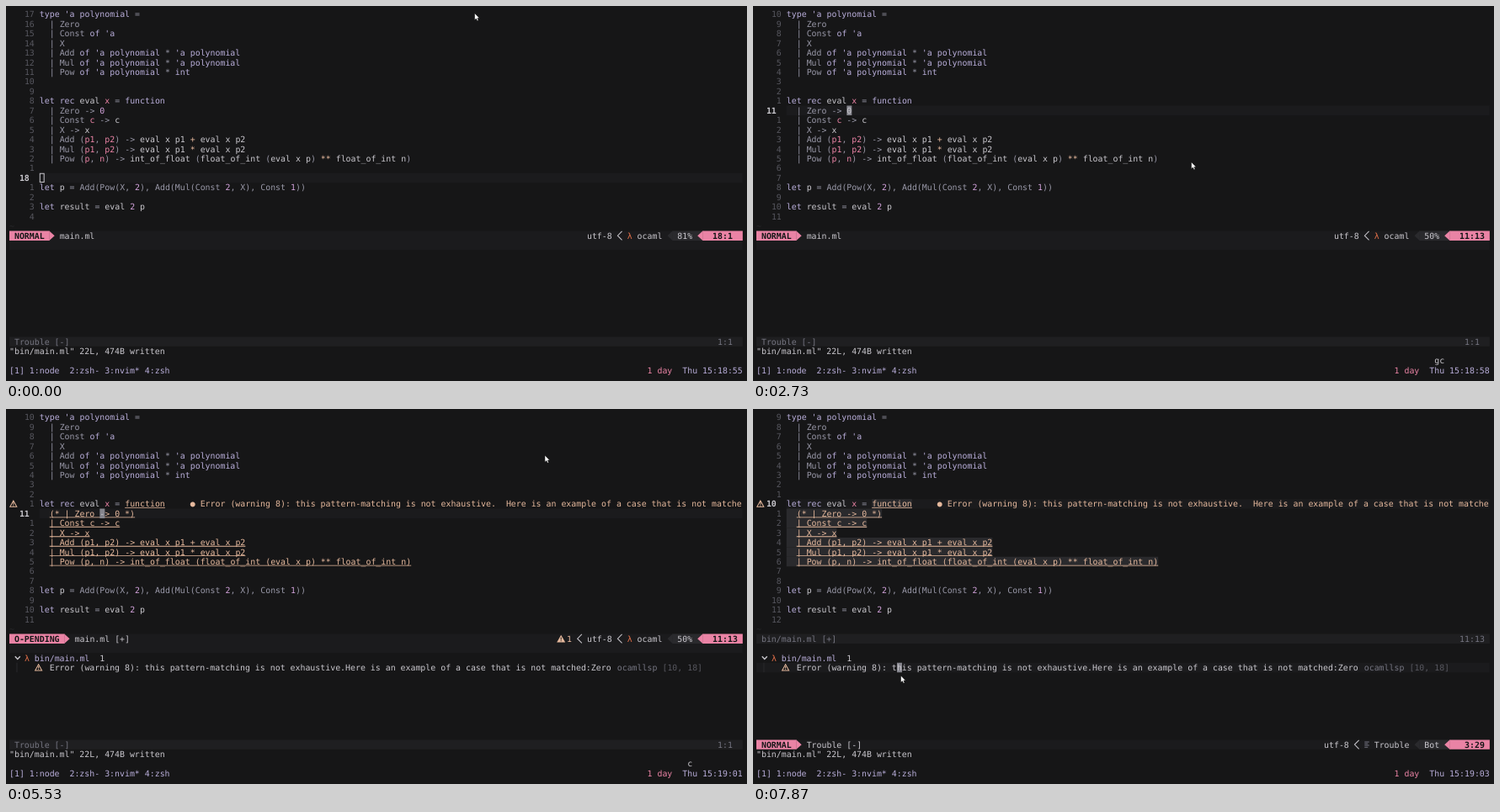
These frames come from a looping animation (880 by 446 pixels, 8 s). An HTML page:

```html
<!DOCTYPE html>
<html lang="en">
<head>
<meta charset="utf-8">
<title>Terminal editor</title>
<style>
  html, body { margin: 0; width: 100%; height: 100%; overflow: hidden; background: #161617; }
  svg { display: block; width: 880px; height: 446px; }
  text {
    font: 9.908px "DejaVu Sans Mono", monospace;
    white-space: pre;
    text-rendering: geometricPrecision;
  }
  .bold { font-weight: bold; }
</style>
</head>
<body>
<svg viewBox="0 0 880 446">
  <!-- The tiny turn keeps text baselines at fractional pixels. -->
  <g id="screen" transform="rotate(.001)"></g>
  <path id="pointer" d="M0 0V8.2L1.9 6.5L3.2 9.2L4.6 8.5L3.4 5.9H5.8Z" fill="#fff" stroke="#000" stroke-width=".5"/>
</svg>
<script>
const LOOP = 8000, TICK = 200 / 3;
const CELL_W = 5.965, CELL_H = 11.45, COLS = 146, CODE_COL = 6;
const C = {
  bg: '#161617', line: '#1b1b1d', idle: '#1f1f21', panel: '#2a2a2d', number: '#57575f', dim: '#57575f',
  gray: '#757581', punct: '#9998a8', fg: '#c9c7cd', pink: '#ea83a5', blue: '#b9aeda',
  magenta: '#d3a3dc', peach: '#e6b99d', orange: '#e3704a', cursor: '#85858d'
};

const code = [
  "type 'a polynomial =",
  "  | Zero",
  "  | Const of 'a",
  "  | X",
  "  | Add of 'a polynomial * 'a polynomial",
  "  | Mul of 'a polynomial * 'a polynomial",
  "  | Pow of 'a polynomial * int",
  "",
  "",
  "let rec eval x = function",
  "  | Zero -> 0",
  "  | Const c -> c",
  "  | X -> x",
  "  | Add (p1, p2) -> eval x p1 + eval x p2",
  "  | Mul (p1, p2) -> eval x p1 * eval x p2",
  "  | Pow (p, n) -> int_of_float (float_of_int (eval x p) ** float_of_int n)",
  "",
  "",
  "let p = Add(Pow(X, 2), Add(Mul(Const 2, X), Const 1))",
  "",
  "let result = eval 2 p",
  ""
];
const commented = "  (* | Zero -> 0 *)";
const warning = "Error (warning 8): this pattern-matching is not exhaustive.";
const example = "Here is an example of a case that is not matched:Zero";

// [time, value] tables; the last entry not after t holds.
const cursorSteps = [[0, [18, 1]], [530, [16, 74]], [1130, [15, 41]], [1530, [14, 41]],
  [1670, [13, 10]], [1870, [12, 16]], [2070, [11, 13]]];
const keySteps = [[0, ''], [2600, 'g'], [2730, 'gc'], [2870, 'c'], [7870, '']];
const clockTicks = [200, 1270, 2270, 3330, 4270, 5330, 6270, 7330];
const pointerPath = [
  [0, 556.5, 8.5], [67, 556.5, 8.5], [133, 548, 60], [200, 527, 150], [267, 520.5, 185.5],
  [4000, 520.5, 185.5], [4067, 518, 188.5], [4200, 490, 180], [4467, 370, 146], [4733, 309.5, 130.5],
  [4867, 342, 118], [5133, 470, 112], [5400, 610, 75], [5533, 640, 55], [5733, 600, 70],
  [5867, 520, 14], [6067, 390, 70], [6200, 318, 150], [6267, 341.5, 170.5], [6400, 430, 165],
  [6600, 605, 146], [6667, 570, 165], [6733, 510, 198], [6800, 452, 222], [6933, 452, 226],
  [7200, 290, 278], [7467, 168, 310], [7600, 175.5, 317]
];

const at = (steps, t) => steps.filter(s => s[0] <= t).pop()[1];
const px = col => 4 + col * CELL_W;
const py = row => 4.1 + row * CELL_H;

const text = (row, col, str, color, cls = '') =>
  `<text x="${px(col)}" y="${py(row) + 9.15}" fill="${color}" class="${cls}">${str}</text>`;
const box = (row, col, width, color) =>
  `<rect x="${px(col)}" y="${py(row)}" width="${width * CELL_W}" height="${CELL_H}" fill="${color}"/>`;
const underline = (row, col, width) =>
  `<rect x="${px(col)}" y="${py(row) + 9.8}" width="${width * CELL_W}" height=".9" fill="${C.peach}"/>`;
const shape = (row, col, d, fill, stroke = 'none', width = 1) =>
  `<path transform="translate(${px(col)} ${py(row)})" d="${d}" fill="${fill}" stroke="${stroke}" stroke-width="${width}"/>`;

const arrowRight = (row, col, color) => shape(row, col, `M-.3 0L${CELL_W} ${CELL_H / 2}L-.3 ${CELL_H}Z`, color);
const arrowLeft = (row, col, color) => shape(row, col, `M${CELL_W + .3} 0L0 ${CELL_H / 2}L${CELL_W + .3} ${CELL_H}Z`, color);
const chevron = (row, col) => shape(row, col, 'M5.8 .5L.6 5.7L5.8 11', 'none', C.fg);
const warnSign = (row, col) =>
  shape(row, col, 'M4.8 1.9L8.8 9.2H.8ZM4.8 4.2V6.6M4.8 7.4V8.3', 'none', C.peach);
const warnSolid = (row, col) =>
  shape(row, col, 'M5 1.2L10 10H0Z', C.peach) + shape(row, col, 'M5 4V7M5 7.8V8.9', 'none', C.line);

function tokenColor(token, row, before) {
  if (/^(type|of|let|rec|function|int|polynomial|'a)$/.test(token)) return C.blue;
  if (/^\d/.test(token)) return C.magenta;
  if (/^[+*]/.test(token)) return row < 7 ? C.punct : C.peach;
  if (/^[A-Z]|^\W/.test(token)) return C.punct;
  const isParam = row === 9 ? token === 'x' : row > 9 && row < 16 && !before.includes('->');
  return isParam ? C.pink : C.fg;
}

function codeLine(row, s) {
  const str = row === 10 && s.comment ? commented : code[row];
  const flagged = s.warned && row > 8 && row < 16;
  let out = '';
  if (flagged) {
    const start = row === 9 ? 17 : 2;
    const from = row === 9 ? 17 : 0;
    if (s.trouble) out += box(row, CODE_COL + from, str.length - from, C.panel);
    out += underline(row, CODE_COL + start, str.length - start);
  }
  if (str === commented) return out + text(row, CODE_COL + 2, str.trim(), flagged ? C.peach : C.gray);
  for (const m of str.matchAll(/'a|\w+|->|\*+|[^\s\w]/g)) {
    const hot = flagged && (row > 9 || m[0] === 'function');
    const color = hot ? C.peach : tokenColor(m[0], row, str.slice(0, m.index));
    out += text(row, CODE_COL + m.index, m[0], color);
  }
  return out;
}

const position = (line, col) => `${String(line).padStart(3)}:${col}`;

function activeStatus(row, o) {
  const end = o.mode.length + 2;
  let out = box(row, 0, COLS, C.line) + box(row, 0, end, C.pink) + arrowRight(row, end, C.pink)
    + text(row, 1, o.mode, C.bg, 'bold') + text(row, end + 2, o.name, C.fg);
  const icon = 123 - (o.type.length - 5);
  out += text(row, icon - 8, 'utf-8', C.fg) + chevron(row, icon - 2) + text(row, icon + 2, o.type, C.fg);
  out += o.type === 'ocaml'
    ? text(row, icon, 'λ', C.orange)
    : shape(row, icon, 'M.5 2.5H6M.5 4.6H4.5M.5 6.7H6M.5 8.8H4.5', 'none', C.gray);
  if (o.warned) out += warnSolid(row, 109) + text(row, 111, '1', C.peach) + chevron(row, 113);
  return out + arrowLeft(row, 131, C.panel) + box(row, 132, 6, C.panel) + text(row, 133, o.percent, C.fg)
    + arrowLeft(row, 137, C.pink) + box(row, 138, 8, C.pink)
    + text(row, 139, position(...o.pos), C.bg, 'bold');
}

const idleStatus = (row, name, pos) =>
  box(row, 0, COLS, C.idle) + text(row, 1, name, C.gray) + text(row, 139, position(...pos), C.gray);

function cursor(row, col, char) {
  return box(row, col, 1, C.cursor) + text(row, col, char, C.fg);
}

function troubleList() {
  return shape(25, 1, 'M.8 4L3.8 7.2L6.8 4', 'none', C.fg, 1.4) + text(25, 3, 'λ', C.orange)
    + text(25, 5, 'bin/main.ml', C.blue) + text(25, 18, '1', C.fg)
    + shape(26, 1, 'M3 0V11.4', 'none', C.panel) + warnSign(26, 5)
    + text(26, 8, warning + example, C.fg) + text(26, 121, 'ocamllsp', C.gray)
    + text(26, 130, '[10, 18]', C.dim);
}

function draw(s) {
  const [line, col] = s.pos;
  const current = s.trouble ? 10 : line;
  let out = box(current - 1, CODE_COL, COLS - CODE_COL, C.line) + box(s.trouble ? 26 : 24, 0, COLS, C.line);

  code.forEach((_, row) => {
    const offset = Math.abs(row + 1 - current);
    out += offset
      ? text(row, 3, String(offset).padStart(2), C.number)
      : text(row, 2, current, C.fg, 'bold');
    out += codeLine(row, s);
  });
  out += text(22, 0, '~', C.panel);

  if (s.warned) {
    out += warnSign(9, 0) + text(9, 36, '●', C.peach)
      + text(9, 38, `${warning}  ${example.slice(0, 47)}`, C.peach);
  }
  if (s.listed) out += troubleList();

  if (s.trouble) {
    out += idleStatus(23, 'bin/main.ml [+]', s.pos)
      + activeStatus(34, { mode: 'NORMAL', name: 'Trouble [-]', type: 'Trouble', percent: 'Bot', pos: [3, 29] })
      + cursor(26, 28, 'h');
  } else {
    out += activeStatus(23, {
      mode: s.warned ? 'O-PENDING' : 'NORMAL',
      name: s.warned ? 'main.ml [+]' : 'main.ml',
      type: 'ocaml', warned: s.warned, pos: s.shownPos,
      percent: Math.floor(s.shownPos[0] / code.length * 100) + '%'
    }) + idleStatus(34, 'Trouble [-]', [1, 1]);
    const str = s.comment ? commented : code[line - 1];
    out += s.focused
      ? cursor(line - 1, CODE_COL + col - 1, str[col - 1])
      : shape(line - 1, CODE_COL, 'M.5 .6H5.4V10.8H.5Z', 'none', C.fg);
  }

  const clock = `15:${s.seconds < 60 ? 18 : 19}:${String(s.seconds % 60).padStart(2, '0')}`;
  return out + text(35, 0, '"bin/main.ml" 22L, 474B written', C.fg) + text(36, 135, s.keys, C.fg)
    + text(37, 0, '[1] 1:node  2:zsh- 3:nvim* 4:zsh', C.blue)
    + text(37, 127, '1 day', C.pink) + text(37, 134, `Thu ${clock}`, C.blue);
}

function stateAt(t) {
  return {
    pos: at(cursorSteps, t),
    shownPos: at(cursorSteps, t < 670 ? 0 : t),
    focused: t >= 530,
    comment: t >= 2870,
    warned: t >= 4070,
    listed: t >= 4270,
    trouble: t >= 7870,
    keys: at(keySteps, t),
    seconds: 55 + clockTicks.filter(tick => tick <= t).length
  };
}

function pointerAt(t) {
  const time = Math.floor((t + 4) / TICK) * TICK;
  const next = pointerPath.findIndex(p => p[0] > time);
  if (next < 0) return pointerPath[pointerPath.length - 1].slice(1);
  const [t0, x0, y0] = pointerPath[next - 1], [t1, x1, y1] = pointerPath[next];
  const k = (time - t0) / (t1 - t0);
  return [x0 + (x1 - x0) * k, y0 + (y1 - y0) * k];
}

const screenLayer = document.getElementById('screen');
const pointer = document.getElementById('pointer');
const start = performance.now();
let shown = '';

function frame() {
  const t = (performance.now() - start) % LOOP;
  const state = stateAt(t), key = JSON.stringify(state);
  if (key !== shown) {
    screenLayer.innerHTML = draw(state);
    shown = key;
  }
  pointer.setAttribute('transform', `translate(${pointerAt(t)})`);
  requestAnimationFrame(frame);
}
frame();
</script>
</body>
</html>
```
